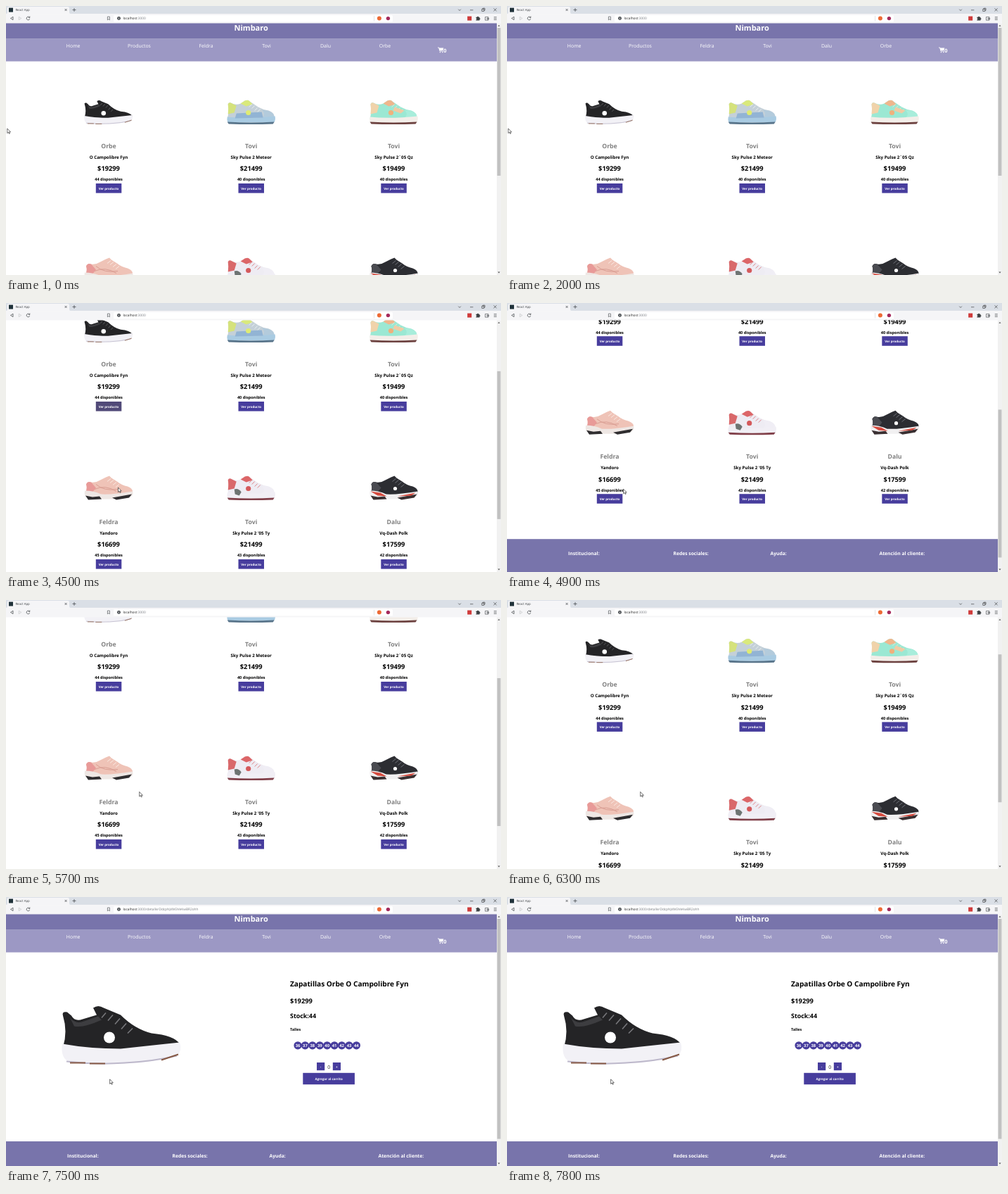
These frames come from a looping animation (704x382 px, 8 s). An HTML page:

```html
<!DOCTYPE html>
<html lang="es">
<head>
<meta charset="utf-8">
<title>React App</title>
<style>
  html, body { margin: 0; width: 100%; height: 100%; overflow: hidden; background: #fff; }
  svg { display: block; width: 704px; height: 382px; }
  text { font-family: "Open Sans", "Noto Sans", sans-serif; text-rendering: geometricPrecision; white-space: pre; }
</style>
</head>
<body>
<svg id="stage" viewBox="0 0 704 382"></svg>
<script>
const LOOP = 8000, STEP = 100;
const BAR = '#7874ab', NAV = '#9c98c4', BUTTON = '#473d9d', HOVER = '#514a78';

const rect = (x, y, w, h, fill, more = '') =>
  `<rect x="${x}" y="${y}" width="${w}" height="${h}" fill="${fill}" ${more}/>`;
const circle = (x, y, r, fill) => `<circle cx="${x}" cy="${y}" r="${r}" fill="${fill}"/>`;
const path = (d, fill) => `<path d="${d}" fill="${fill}"/>`;
const line = (d, color, width = .7) =>
  `<path d="${d}" fill="none" stroke="${color}" stroke-width="${width}"/>`;
const text = (s, x, y, size, fill = '#000', weight = 700, anchor = 'middle') =>
  `<text x="${x}" y="${y}" font-size="${size}" fill="${fill}" font-weight="${weight}" text-anchor="${anchor}">${s}</text>`;
const left = (s, x, y, size, fill, weight) => text(s, x, y, size, fill, weight, 'start');
const group = (body, transform = '', id = '') =>
  `<g ${id && `id="${id}"`} transform="${transform}">${body}</g>`;

// Shoes, toe to the right
const darkShoe =
  path('M2 15Q0 9 8 10L14 15Q19 24 30 20L50 14L45 4Q52 -1 60 4L84 14Q104 34 128 40Q160 43 168 55L165 66L2 60Q9 38 2 15Z', '#242426') +
  path('M12 18Q20 28 32 23L52 16L57 21Q30 33 18 30Z', '#3d3d40') +
  line('M63 11l-6 7M73 14l-7 8M83 19l-7 8M92 26l-7 8M101 33l-7 7', '#77777b', 1.6) +
  path('M1 55Q40 62 84 62Q130 57 168 53Q172 65 164 72Q120 84 80 83L12 81Q-2 76 1 55Z', '#f2f1f6') +
  line('M7 80Q50 85 90 82Q130 80 164 72', '#bdb8cb', 2) +
  line('M12 82H34M40 83H62M142 78L166 70', '#875a46', 2) +
  circle(68, 46, 8, '#fff');

function sneaker(c, extra = '') {
  return path('M2 6Q3 3 6 4Q13 8 20 5L26 1Q31 -1 33 2L45 10Q52 14 60 15Q68 18 68 25L1 27Q4 15 2 6Z', c.main) +
    path('M2 6Q3 3 6 4L14 8L11 18L2 20Q3 12 2 6Z', c.heel) +
    path('M20 5L26 1Q31 -1 33 2L37 6L28 9Z', c.tongue) +
    path('M50 14Q68 15 68 25L51 25Q56 19 50 14Z', c.toe) +
    line('M36 6l-4 4M40 8l-4 4M44 11l-4 4M48 13l-4 4', c.lace, .9) +
    path('M1 24Q30 27 69 23Q70 30 67 32L2 32Q0 28 1 24Z', c.sole) +
    path('M1 31Q35 33 68 31L66 34Q35 35 3 34Z', c.out) +
    extra + circle(31, 18, 3.6, c.mark);
}

function runner(c, extra = '') {
  return path('M3 12Q5 7 10 9Q17 10 23 6L31 2L36 0L39 3L47 8Q53 13 62 15Q70 18 69 24L40 28L2 24Q5 18 3 12Z', c.main) +
    path('M3 12Q5 7 10 9L17 17L12 23L2 24Q5 18 3 12Z', c.heel) +
    line('M38 4l-5 4M42 6l-5 4M46 9l-5 4M50 12l-5 4', c.lace, .9) +
    path('M1 21Q14 21 24 26Q40 27 69 22Q71 27 66 30L40 33L12 33L2 29Q0 25 1 21Z', c.sole) +
    path('M2 28L12 30L22 29L25 33L6 34ZM40 31L68 26L64 31L46 34Z', c.out) + extra;
}

const shoes = [
  group(darkShoe, 'scale(.408)'),
  sneaker({ main: '#c4d0d8', heel: '#d5e27c', tongue: '#d9e97c', toe: '#b3cbdc', lace: '#eef3f5',
    sole: '#a9cbe2', out: '#58748a', mark: '#dfeb72' }, path('M14 19L50 17L52 25L12 26Z', '#92b4d4')),
  sneaker({ main: '#9be8d3', heel: '#f0d3aa', tongue: '#efb68c', toe: '#a8eddb', lace: '#f5e3cf',
    sole: '#f3eee9', out: '#6d4240', mark: '#efb17c' }, path('M36 10L50 15L45 19L34 15Z', '#f0cba4')),
  runner({ main: '#efc3b7', heel: '#e89a98', lace: '#fbece6', sole: '#eee7e4', out: '#302e30' },
    line('M17 12Q28 22 48 19M15 19Q30 12 46 22', '#d99d92', 1)),
  sneaker({ main: '#eeecf3', heel: '#d9696b', tongue: '#dc6668', toe: '#f0eef5', lace: '#db797b',
    sole: '#f1eff5', out: '#81404a', mark: '#d4595b' }, path('M11 19Q17 17 21 23L18 28L12 26Z', '#6d7472')),
  runner({ main: '#2c2d32', heel: '#4a4b51', lace: '#777981', sole: '#f1f0f1', out: '#3a3032' },
    path('M2 22L16 24L25 29L12 28ZM40 29L66 24L60 28Z', '#d5493d') + circle(37, 18, 2.6, '#fff')),
];

const COLS = [146, 348.7, 551.5];
const PITCH = 224;
const items = [
  ['Orbe', 'O Campolibre Fyn', 19299, 44],
  ['Tovi', 'Sky Pulse 2 Meteor', 21499, 40],
  ['Tovi', 'Sky Pulse 2´05 Qz', 19499, 40],
  ['Feldra', 'Yandoro', 16699, 45],
  ['Tovi', "Sky Pulse 2 '05 Ty", 21499, 43],
  ['Dalu', 'Vq-Dash Polk', 17599, 42],
];

function card([brand, name, price, stock], i) {
  const x = COLS[i % 3], id = i ? '' : 'id="first"';
  return group(
    group(shoes[i], `translate(${x - 35} 133.5)`) +
    text(brand, x, 202, 8.7, '#808080') +
    text(name, x, 216.6, 6.2) +
    text('$' + price, x, 234.4, 9.3) +
    text(stock + ' disponibles', x, 248.4, 5.6) +
    rect(x - 18.2, 252, 36.5, 13.6, BUTTON, id) +
    text('Ver producto', x, 260.6, 4.45, '#fff'),
    `translate(0 ${i < 3 ? 0 : PITCH})`);
}

const navLinks = [['Home', 95.7], ['Productos', 189.5], ['Feldra', 284.5], ['Tovi', 370.5], ['Dalu', 454.5], ['Orbe', 539]];
const header =
  rect(0, 24, 698, 22.7, BAR) + text('Nimbaro', 348.7, 34.6, 11, '#fff') +
  rect(0, 46.7, 698, 31.9, NAV) +
  navLinks.map(([s, x]) => text(s, x, 58.5, 6.95, '#fff', 400)).join('') +
  line('M614 59h1.6l1.4 5h4.6', '#fff', .9) + path('M615.8 59.6H622.3L621.4 63H616.7Z', '#fff') +
  circle(617.4, 65.6, .8, '#fff') + circle(620.8, 65.6, .8, '#fff') +
  text('0', 624.4, 65.6, 7.4, '#fff');

const footLinks = [['Institucional:', 87], ['Redes sociales:', 236.5], ['Ayuda:', 374.5], ['Atención al cliente:', 529.5]];
const footer = y => rect(0, y, 698, 70, BAR) +
  footLinks.map(([s, x]) => left(s, x, y + 22.6, 6.75, '#fff')).join('');

const list = header + items.map(card).join('') + footer(540);

const sizes = Array.from({ length: 9 }, (_, i) => {
  const x = 415 + i * 10.42;
  return circle(x, 210.8, 5.6, BUTTON) + text(36 + i, x, 212.9, 5.8, '#fff');
}).join('');

const detail = header +
  group(darkShoe, 'translate(79 153.5)') +
  left('Zapatillas Orbe O Campolibre Fyn', 404, 127, 10.1) +
  left('$19299', 404, 151, 9.3) +
  left('Stock:44', 404, 172.3, 8.9) +
  left('Talles', 404, 190, 5.4) + sizes +
  rect(442, 235, 11.2, 11.2, BUTTON) + text('-', 447.6, 242.6, 4.6, '#fff') +
  text('0', 459.2, 243.6, 6.8, '#222', 400) +
  rect(464.8, 235, 11.2, 11.2, BUTTON) + text('+', 470.4, 242.8, 4.6, '#fff') +
  rect(422.3, 249.8, 73.6, 16.4, BUTTON) + text('Agregar al carrito', 459.1, 259.8, 4.5, '#fff') +
  footer(347);

const INK = '#3c4043', TOOLBAR = '#f5f5f7';
const chrome =
  rect(0, 0, 704, 11.2, '#dadfe6') + rect(0, 11, 704, 13.5, TOOLBAR) +
  path('M0 11.2Q2 11 2 9V3Q2 1 4 1H88Q90 1 90 3V9Q90 11 92 11.2Z', TOOLBAR) +
  rect(4, 2.6, 6, 6, '#20323a') + left('React App', 13.4, 7.3, 4.35, INK, 400) +
  line('M83.6 4l3 3M86.6 4l-3 3M94.5 5.5h5M97 3v5', INK) +
  line('M643.3 4.7l1.8 1.8l1.8 -1.8M660 5.8h4.4M676.8 4.4h3v3h-3zM678 4.2v-1h3v3h-1M693.6 3.4l4 4M697.6 3.4l-4 4', '#222', .6) +
  line('M10 15.3L6.5 17.5L10 19.7Z', INK) +
  line('M18.3 15.3L21.8 17.5L18.3 19.7Z', '#c4c6c8') +
  line('M33.2 16A2.3 2.3 0 1 0 33.7 18.2M33.8 14.6V16.6H31.8', INK) +
  line('M144.4 15.2h3v4.6l-1.5 -1.3l-1.5 1.3z', INK, .6) +
  rect(153, 13, 397, 9.4, '#fff', 'rx="1.5"') +
  circle(160.5, 17.5, 2.4, '#45494d') + rect(160.2, 17, .7, 1.8, '#fff') + rect(160.2, 15.9, .7, .7, '#fff') +
  left('localhost<tspan fill="#777b80">:3000<tspan id="route"></tspan></tspan>', 166.4, 19.2, 4.8, '#222', 400) +
  rect(523.2, 14, .6, 7.4, '#cfd2d5') + circle(530.9, 17.4, 3, '#ed6a35') + circle(543.4, 17.6, 2.7, '#a52a5c') +
  rect(656.2, 14.6, 6, 6, '#cf3a3a') +
  path('M668.5 15.8h1.6a1 1 0 0 1 2 0h1.4v1.5a1 1 0 0 1 0 2v1.2h-5v-1.3a.9 .9 0 0 0 0 -1.8z', INK) +
  line('M681.5 15.6h4.4v4.6h-4.4zM684 17.2h2.6v1.6h-2.6z', INK, .6) +
  line('M693.8 15.7h4M693.8 17.6h4M693.8 19.5h4', INK, .6);

const scrollbar = rect(698, 24.5, 6, 357.5, '#f1f1f1') +
  path('M699.4 28.8L701 27L702.6 28.8Z', '#505050') + path('M699.4 377.6L701 379.4L702.6 377.6Z', '#505050') +
  rect(698.6, 31, 4.8, 210, '#c1c1c1', 'id="thumb"');

const pointer = '<path d="M0 0V6.6L1.6 5.2L2.7 7.5L3.7 7L2.7 4.9H4.7Z" fill="#fff" stroke="#111" stroke-width=".6"/>';

const $ = id => document.getElementById(id);
$('stage').innerHTML =
  rect(0, 0, 704, 382, '#fff') +
  group(list, '', 'list') + group(detail, '', 'detail') +
  scrollbar + chrome + group(pointer, '', 'pointer');

// [time, value...]: down to the footer, part of the way back, then to the top
const scrollKeys = [
  [3900, 0], [4500, 112], [5000, 228], [5300, 228], [5700, 136], [5900, 118], [6200, 118], [6500, 0],
];
const pointerKeys = [
  [2100, 1.8, 174], [2500, 73, 285], [2800, 115, 275], [3000, 140, 262], [3200, 147.2, 256.4], [3900, 147.2, 256.4],
  [4400, 159.5, 262], [4800, 159.5, 262], [5300, 189.7, 272.4], [6800, 189.7, 272.4], [7300, 147.6, 258.8],
];

function at(keys, t) {
  const n = keys.findIndex(k => k[0] > t);
  if (n === 0) return keys[0].slice(1);
  if (n < 0) return keys[keys.length - 1].slice(1);
  const a = keys[n - 1], b = keys[n], p = (t - a[0]) / (b[0] - a[0]);
  return a.slice(1).map((v, i) => v + (b[i + 1] - v) * p);
}

function draw(now) {
  const t = Math.floor(now % LOOP / STEP) * STEP;
  const [scroll] = at(scrollKeys, t);
  const [x, y] = at(pointerKeys, t);
  const open = t >= 7500;
  const hover = (t >= 3000 && t < 4700) || t >= 7200;
  $('list').setAttribute('transform', `translate(0 ${-scroll})`);
  $('list').style.display = open ? 'none' : '';
  $('detail').style.display = open ? '' : 'none';
  $('first').setAttribute('fill', hover ? HOVER : BUTTON);
  $('thumb').setAttribute('y', 31 + scroll * .588);
  $('thumb').setAttribute('height', open ? 312.5 : 210);
  $('route').textContent = open ? '/detalle/DdcpNJ4M3VeKwBR2ohh' : '';
  $('pointer').setAttribute('transform', `translate(${x} ${y})`);
}

const start = performance.now();
function tick() {
  draw(performance.now() - start);
  requestAnimationFrame(tick);
}
tick();
</script>
</body>
</html>
```
